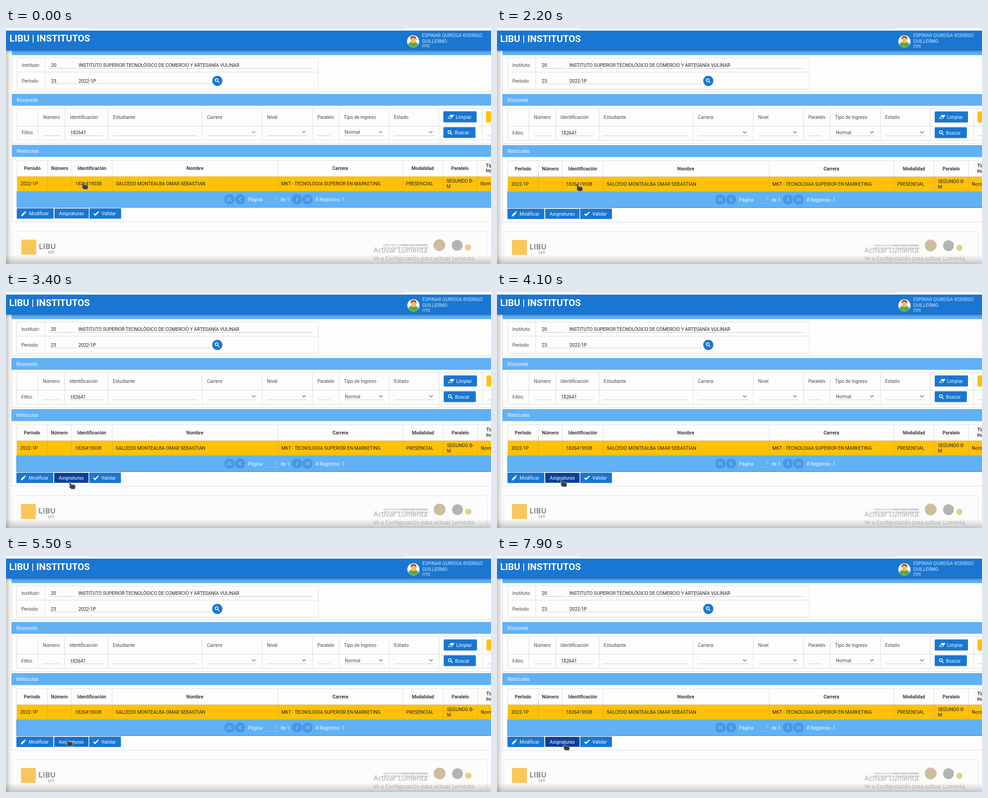
Animation of 1072x522 px, one loop 8000 ms. Source, as an HTML page:

```html
<!DOCTYPE html>
<html lang="es">
<head>
<meta charset="utf-8">
<title>Matrículas</title>
<style>
html, body { margin: 0; width: 100%; height: 100%; overflow: hidden; background: #fdfdfd; }
svg { display: block; width: 1072px; height: 522px; }
text { font-family: Roboto, sans-serif; font-size: 10.4px; fill: #222; }
.label text { fill: #4a4a4a; }
.head text { font-weight: 700; fill: #3c3c3c; text-anchor: middle; }
.light text, text.light { fill: #f4f9ff; }
.user text { fill: #cfe4f8; font-size: 10.3px; }
.open { font-family: "Open Sans", sans-serif; }
.grid { fill: none; stroke: #dcdcdc; }
.field { fill: none; stroke: #c9c9c9; }
.bar { fill: #62b1f5; }
.btn { fill: #1976d2; }
.stroke { fill: none; stroke: #fff; stroke-width: 1.6; }
.mark text { fill: #a8a8a8; font-family: "Open Sans", sans-serif; }
.tiny text { font-size: 5.6px; fill: #a0a0a0; }
#page { transform-origin: 520px 20px; }
</style>
</head>
<body>
<svg viewBox="0 0 1072 522">
  <defs>
    <linearGradient id="side"><stop stop-opacity=".2"/><stop offset=".5" stop-opacity=".09"/><stop offset="1" stop-opacity="0"/></linearGradient>
    <linearGradient id="down" x2="0" y2="1"><stop stop-opacity="0"/><stop offset="1" stop-opacity=".2"/></linearGradient>
    <linearGradient id="drop" x2="0" y2="1"><stop stop-opacity=".22"/><stop offset="1" stop-opacity="0"/></linearGradient>
    <g id="lens" class="stroke"><circle cx="-1" cy="-1" r="3.2"/><path d="M1.4 1.4 5 5"/></g>
    <path id="chevron" d="M-3.6-1.8 0 1.8 3.6-1.8" fill="none" stroke="#666" stroke-width="1.3"/>
  </defs>
  <rect width="1072" height="522" fill="#fdfdfd"/>

  <g id="page">
    <!-- panels -->
    <path class="grid" d="M12.5 50V141.5H1090M12.5 146V255.5H1090M12.5 259V429.5H1090"/>
    <rect class="bar" x="12" y="48" width="1080" height="12"/>
    <rect class="bar" x="12" y="146" width="1080" height="26"/>
    <rect class="bar" x="12" y="259" width="1080" height="26.5"/>
    <rect x="-10" y="50" width="1100" height="6" fill="url(#drop)"/>

    <!-- header -->
    <rect class="btn" x="-10" y="5.5" width="1100" height="44.5"/>
    <text x="7" y="30.5" style="font-size:20.8px;font-weight:700;fill:#fff">LIBU | INSTITUTOS</text>
    <circle cx="900.5" cy="29.5" r="13.5" fill="#f7f7f4"/>
    <path d="M889.5 37Q891 31.5 897 31H904Q910 31.5 911.5 37 907 42.5 900.5 42.5 894 42.5 889.5 37Z" fill="#58ad3a"/>
    <ellipse cx="900.5" cy="26.5" rx="5.8" ry="7" fill="#f2b878"/>
    <path d="M894 26Q893 17.5 900.5 17.5 908 17.5 907 26 905 21.5 900.5 22 896 21.5 894 26Z" fill="#a9571c"/>
    <g class="user">
      <text x="920" y="20">ESPINAR QUIROGA RODRIGO</text>
      <text x="920" y="33">GUILLERMO</text>
      <text x="920" y="43.5" style="font-size:8.7px">ITPE</text>
    </g>

    <!-- institute form -->
    <path class="grid" d="M23.5 66.5H690.5V135.5H23.5ZM23.5 97.5H690.5M85.5 66.5V135.5"/>
    <path class="field" d="M98 89.5H153M158 89.5H678M98 123.5H155M158 123.5H454"/>
    <g class="label"><text x="34" y="86">Instituto:</text><text x="34" y="121">Período:</text></g>
    <text x="99" y="86">20</text>
    <text x="160" y="86">INSTITUTO SUPERIOR TECNOLÓGICO DE COMERCIO Y ARTESANÍA VULINAR</text>
    <text x="99" y="121">23</text><text x="160" y="121">2022-1P</text>
    <circle class="btn" cx="467" cy="117" r="11.2"/><use href="#lens" x="466.5" y="116.5"/>

    <!-- search -->
    <text class="light" x="23" y="163">Búsqueda</text>
    <path class="grid" d="M1090 178.5H23.5V248.5H1090M23.5 217.5H1090M70.5 178.5v70M129.5 178.5v70M225.5 178.5v70M433.5 178.5v70M566.5 178.5v70M677.5 178.5v70M736.5 178.5v70M847.5 178.5v70M957.5 178.5v70M1053.5 178.5v70"/>
    <path class="field" d="M82 238.5h37M141 238.5h73M236 238.5h186M444 238.5h111M577 238.5h89M688 238.5h29M747 238.5h89M858 238.5h89M1062 238.5h30"/>
    <g class="label">
      <text x="81.5" y="201">Número</text><text x="140.5" y="201">Identificación</text>
      <text x="236" y="201">Estudiante</text><text x="444" y="201">Carrera</text>
      <text x="577" y="201">Nivel</text><text x="688" y="201">Paralelo</text>
      <text x="747" y="201">Tipo de Ingreso</text><text x="858" y="201">Estado</text>
      <text x="34" y="235.5">Filtro:</text><text x="749" y="234.5">Normal</text>
    </g>
    <text x="141.5" y="235.5">182641</text>
    <use href="#chevron" x="547.5" y="230.5"/><use href="#chevron" x="658.5" y="230.5"/>
    <use href="#chevron" x="828.5" y="230.5"/><use href="#chevron" x="939.5" y="230.5"/>
    <rect class="btn" x="967.5" y="184.5" width="73.5" height="24.5" rx="1.5"/>
    <path d="M976.5 201 983 192.5H991.5L985 201Z" fill="#fff"/><path d="M978.5 200 981 196.7H986.5L984 200Z" class="btn"/>
    <rect class="btn" x="967.5" y="219.5" width="71" height="24" rx="1.5"/>
    <use href="#lens" x="982" y="231.5"/>
    <g class="light"><text x="995" y="201">Limpiar</text><text x="992.5" y="235.5">Buscar</text></g>
    <rect x="1062" y="184.5" width="30" height="24.5" rx="1.5" fill="#ffc107"/>

    <!-- enrolments -->
    <text class="light" x="23" y="276">Matrículas</text>
    <path class="grid" d="M1090 293.5H23.5V362M23.5 328.5H1090M91.5 293.5v35M144.5 293.5v35M234.5 293.5v35M601.5 293.5v35M877.5 293.5v35M966.5 293.5v35M1042.5 293.5v35"/>
    <g class="head">
      <text x="57.5" y="315">Período</text><text x="118" y="315">Número</text>
      <text x="189.5" y="315">Identificación</text><text x="417.5" y="315">Nombre</text>
      <text x="739" y="315">Carrera</text><text x="921.5" y="315">Modalidad</text>
      <text x="1004" y="315">Paralelo</text>
      <text x="1079" y="308">Tipo de</text><text x="1079" y="320">Ingreso</text>
    </g>
    <rect x="24" y="329" width="1070" height="33" fill="#ffc107"/>
    <path d="M91.5 329v33M144.5 329v33M234.5 329v33M601.5 329v33M877.5 329v33M966.5 329v33M1042.5 329v33" fill="none" stroke="#e2ac0c"/>
    <text x="31.5" y="349">2022-1P</text><text x="152.5" y="349">1826419038</text>
    <text x="242.5" y="349">SALCEDO MONTEALBA OMAR SEBASTIAN</text>
    <text x="608.5" y="349">MKT - TECNOLOGIA SUPERIOR EN MARKETING</text>
    <text x="884.5" y="349">PRESENCIAL</text>
    <text x="974.5" y="343">SEGUNDO B-</text><text x="974.5" y="355">M</text>
    <text x="1049.5" y="349">Normal</text>

    <!-- pager -->
    <rect class="bar" x="23" y="361.5" width="1070" height="36"/>
    <path d="M23.5 362V397.5H1090" fill="none" stroke="#2f86dc"/>
    <g fill="#4698e6">
      <circle cx="494" cy="379.5" r="11.3"/><circle cx="517.5" cy="379.5" r="11.3"/>
      <circle cx="643" cy="379.5" r="11.3"/><circle cx="666.5" cy="379.5" r="11.3"/>
    </g>
    <path d="M490.5 375v9M498 375.5l-4 4 4 4M519.5 375.5l-4 4 4 4M641 375.5l4 4-4 4M662.5 375.5l4 4-4 4M670 375v9" fill="none" stroke="#a9d1f8" stroke-width="1.3"/>
    <path d="M572 387.5H602" stroke="#83bff4"/>
    <g class="light">
      <text x="535" y="383.5">Página</text><text x="594.5" y="383.5" opacity=".45">1</text>
      <text x="607" y="383.5">de 1</text><text x="684" y="383.5">#&#160;Registros: 1</text>
    </g>

    <!-- actions -->
    <rect class="btn" x="23" y="399.5" width="81.5" height="23" rx="1"/>
    <rect class="btn" id="subjects" x="106.5" y="400" width="76" height="22" rx="1"/>
    <rect class="btn" id="validate" x="184" y="399.5" width="70" height="23" rx="1"/>
    <path d="M33 416.5v-2.7l6.5-6.5 2.7 2.7-6.5 6.5ZM40.3 406.5l1.3-1.3 2.7 2.7-1.3 1.3Z" fill="#fff"/>
    <path class="stroke" style="stroke-width:2.6" d="M193.5 411l3.3 3.3 7.500-7.500"/>
    <g class="light">
      <text x="50" y="414.7">Modificar</text><text x="116.5" y="414.7">Asignaturas</text><text x="210.5" y="414.7">Validar</text>
    </g>

    <!-- footer -->
    <rect x="14.5" y="450.5" width="1049" height="69" rx="2" fill="#fcfcfc" stroke="#e4e4e4"/>
    <rect x="33" y="469" width="33" height="33" fill="#f8c75c"/>
    <text class="open" x="71.5" y="490" style="font-size:16.5px;font-weight:700;fill:#8d8d8d">LIBU</text>
    <text class="open" x="92.5" y="499.5" style="font-size:9.5px;font-weight:700;fill:#a5a5a5">IST</text>
    <g class="tiny">
      <text x="834" y="482.5">DIRECCIÓN DE <tspan font-weight="700">FORMACIÓN SUPERIOR,</tspan></text>
      <text x="834" y="488.5">ARTES, OFICIOS Y PROGRESO REGIONAL</text>
    </g>
    <circle cx="958.5" cy="481" r="13" fill="#cdbd9c"/>
    <circle cx="998" cy="481.5" r="12" fill="#b4b4b2"/>
    <circle cx="1022" cy="486" r="7" fill="#e8d08c"/>
  </g>

  <!-- browser edge, shading and overlay -->
  <rect width="1072" height="5.5" fill="#fdfdfd"/>
  <path d="M181-1Q183 .5 188 .5H876Q881 .5 883-1" fill="none" stroke="#c4c4c4"/>
  <rect y="50" width="13" height="472" fill="url(#side)"/>
  <rect y="502" width="1072" height="20" fill="url(#down)"/>
  <g class="mark">
    <text x="812.5" y="497" style="font-size:15.7px">Activar Lumenta</text>
    <text x="812" y="514" style="font-size:11.8px">Ve a Configuración para activar Lumenta.</text>
  </g>

  <path id="hand" d="M-1.7 1.5Q-1.8 0-.4 0 .9 0 1.4 1.5L2.6 5.3 9.5 6.3Q12 6.8 12.3 9.2L12.5 12 11.3 16H3.2L-1.2 11.7Q-2.4 10 .2 9.7Z" fill="#3d4147" stroke="#cfcfcf" stroke-width=".7"/>
</svg>
<script>
const LOOP = 8000;
const BLUE = '#1976d2', NAVY = '#0c3f98';

// Each step is [ms, value] and holds until the next one.
function play(id, prop, steps) {
  const frames = steps.map(([t, v]) => ({ offset: t / LOOP, [prop]: v, easing: 'steps(1, end)' }));
  frames.push({ ...frames[frames.length - 1], offset: 1 });
  document.getElementById(id).animate(frames, { duration: LOOP, iterations: Infinity });
}

const path = [
  [0, 169, 341], [900, 174, 337], [1000, 177, 343],
  [2200, 177, 345], [2300, 177, 352], [2400, 172, 375], [2500, 162, 404], [2600, 150, 427],
  [2700, 140, 417], [2800, 136, 409], [2900, 139, 408], [3000, 142, 408], [3100, 146, 411],
  [3300, 144, 415], [3400, 141, 420], [3500, 139, 421], [3600, 138, 419], [3700, 138, 417],
  [4100, 142, 415], [4200, 161, 413], [4300, 191, 412], [4400, 208, 411], [4500, 213, 411],
  [5200, 208, 404], [5300, 183, 364], [5400, 150, 386], [5500, 135, 405], [5600, 135, 413],
  [5700, 137, 415], [5800, 138, 413], [5900, 138, 411],
  [6100, 137, 417], [6300, 138, 416], [6400, 140, 415], [6600, 143, 411], [7400, 144, 411], [7900, 148, 414]
];
play('hand', 'transform', path.map(([t, x, y]) => [t, `translate(${x}px, ${y}px)`]));
play('page', 'transform', [[0, 'scale(.9983)'], [500, 'scale(1)']]);
play('subjects', 'fill', [
  [0, BLUE], [2700, '#1565bf'], [2800, '#0f4dab'], [2900, NAVY],
  [4300, '#1259b4'], [4400, BLUE],
  [5500, '#176ecb'], [5600, '#1259b4'], [5700, '#0e4aa5'], [5800, NAVY]
]);
play('validate', 'fill', [
  [0, BLUE], [4300, '#1565bf'], [4400, '#0f4dab'], [4500, NAVY], [5300, '#1259b4'], [5400, BLUE]
]);
</script>
</body>
</html>
```
